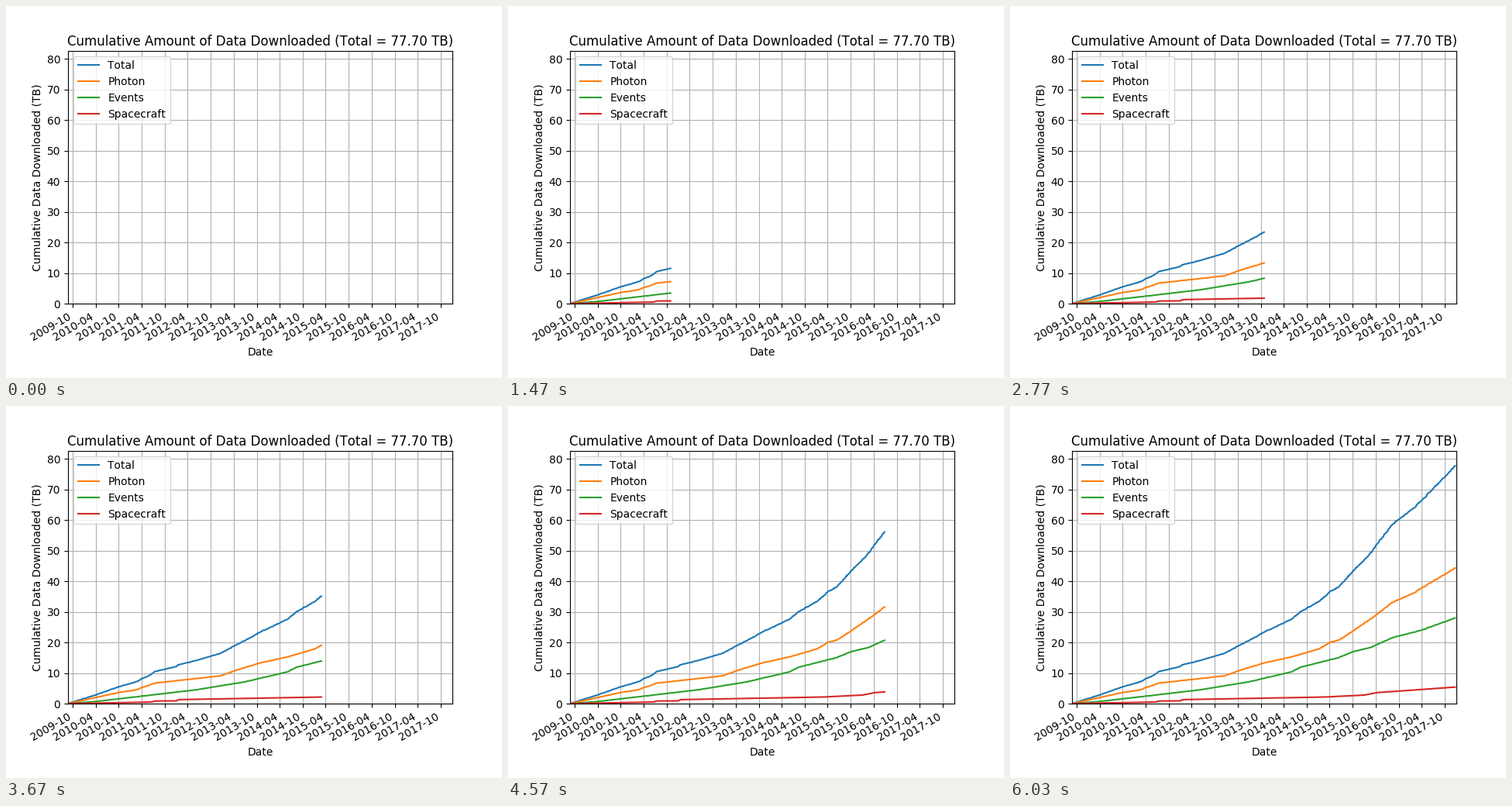
Recreate the animation shown at these times as a matplotlib script. Size 640 by 480 pixels, loop 6.11 s.

```python
import matplotlib.pyplot as plt
import numpy as np
from matplotlib.animation import FuncAnimation

LOOP_MS = 6110
FRAMES = 184

START = np.datetime64("2009-08-25")
SPAN = 3051         # days across the x axis
FIRST, LAST = 6, 3042
STEP_DAYS = 18      # days revealed per frame
GAP_STEP, GAP_DAYS = 47, 25     # a stretch without records

# Main bends of each curve: (years since START, terabytes)
PHOTON = [(0, 0), (1.09, 3.6), (1.45, 4.4), (1.89, 6.7), (3.33, 9.1),
          (3.65, 10.9), (4.18, 13.3), (4.81, 15.4), (5.39, 18), (5.59, 19.9),
          (5.82, 20.9), (6.6, 28.8), (6.95, 33), (7.41, 36.1), (8.33, 44.3)]
EVENTS = [(0, 0), (.61, .7), (2.1, 3.3), (2.78, 4.5), (3.84, 7.1),
          (4.78, 10.4), (4.97, 11.9), (5.79, 15), (6.09, 16.9), (6.5, 18.4),
          (6.97, 21.6), (7.59, 24), (8.33, 28)]
SPACECRAFT = [(0, 0), (1.82, .5), (1.89, .85), (2.37, .9), (2.42, 1.3),
              (5.51, 2.15), (6.36, 2.8), (6.63, 3.6), (8.33, 5.4)]

plt.rcParams["text.kerning_factor"] = 6

# Weekly totals, with records arriving slightly early or late
rng = np.random.default_rng(4)
weeks = np.arange(FIRST, SPAN, 7)
years = weeks / 365.25 + rng.normal(0, .009, weeks.size)
years = np.maximum.accumulate(years)
parts = [np.interp(years, *np.transpose(bends))
         for bends in (PHOTON, EVENTS, SPACECRAFT)]
series = [sum(parts), *parts]

fig, ax = plt.subplots(figsize=(6.4, 4.8), dpi=100)
lines = [ax.plot([], [], label=name)[0]
         for name in ("Total", "Photon", "Events", "Spacecraft")]

months = np.arange(np.datetime64("2009-10"), np.datetime64("2018-01"),
                   np.timedelta64(6, "M"))
days = (months.astype("datetime64[D]") - START).astype(int)
ax.set_xticks(days, months.astype(str))
ax.set_xlim(0, SPAN)
ax.set_ylim(0, 82.7)
ax.set_xlabel("Date")
ax.set_ylabel("Cumulative Data Downloaded (TB)")
ax.set_title("Cumulative Amount of Data Downloaded (Total = 77.70 TB)", pad=5)
ax.grid(True)
ax.legend(loc="upper left")
fig.autofmt_xdate()


def draw(step):
    tip = FIRST + STEP_DAYS * step + GAP_DAYS * (step > GAP_STEP)
    tip = min(tip, LAST)
    x = np.append(weeks[weeks < tip], tip)
    for line, values in zip(lines, series):
        line.set_data(x, np.interp(x, weeks, values))
    return lines


anim = FuncAnimation(fig, draw, frames=FRAMES, interval=LOOP_MS / FRAMES,
                     repeat=True, repeat_delay=0)
plt.show()
```
